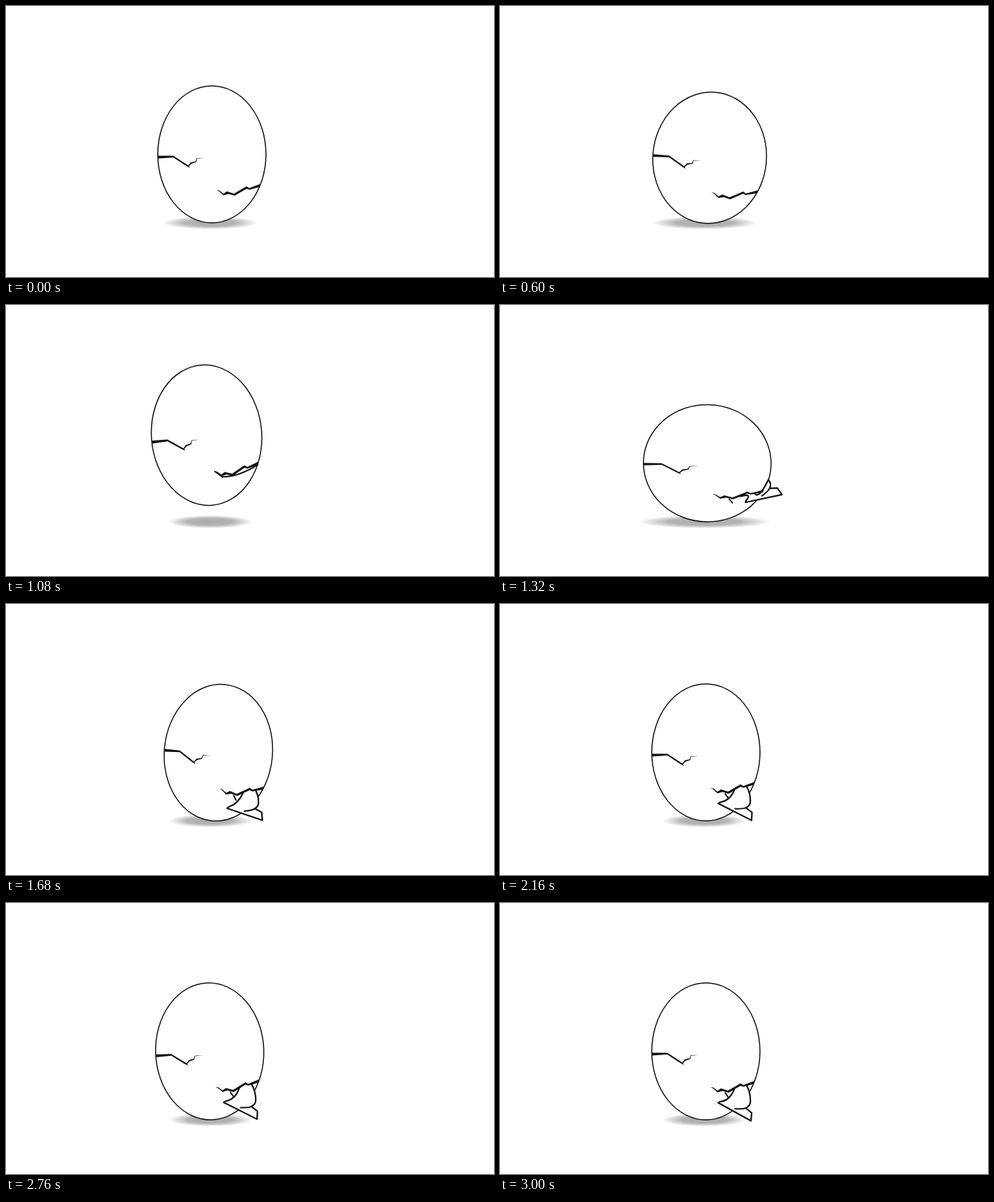
Recreate the animation shown at these times as an HTML page with a canvas. Size 700x390 px, loop 3480 ms.

```html
<!DOCTYPE html>
<html lang="en">
<head>
<meta charset="utf-8">
<title>Hatching egg</title>
<style>
  html, body { margin: 0; width: 100%; height: 100%; overflow: hidden; background: #fff; }
  canvas { display: block; }
</style>
</head>
<body>
<canvas id="stage" width="700" height="390"></canvas>
<script>
const ctx = document.getElementById('stage').getContext('2d');
const LOOP = 3480, HOLD = 600, STEP = 120, LAST_STEP = 21;
const CENTER_X = 295.3, GROUND = 312;

// Each track holds [step, value] keys with straight motion between them.
const tilt = track([0, 0], [2, 10], [4, -2], [5, -4.3], [6, 0], [11, 6.8], [16, -4.5], [21, 0]);
const width = track([0, 1], [2, 1.1], [3, 1], [4, 1.03], [5, 1.02], [7, 1.18], [9, 1]);
const lift = track([0, 0], [2, -1], [3, 24], [4, 52], [5, 23.8], [6, 0]);
const shift = track([0, 0], [2, -5.6], [4, 0]);
const shadow = track([0, 68], [2, 83], [4, 54], [5, 61], [7, 95], [9, 60]);
const heelX = track([6, 325], [7, 352], [10, 317], [11, 318], [14, 313], [16, 311], [21, 313]);
const heelY = track([6, 278], [7, 284], [10, 294], [14, 287], [16, 286], [21, 287.5]);
const footAngle = track([6, 0], [7, -12], [10, 18.8], [11, 17], [14, 27], [16, 23.5], [21, 29]);

function track(...keys) {
  return step => {
    const next = keys.findIndex(key => key[0] >= step);
    if (next < 1) return keys.at(next)[1];
    const [from, start] = keys[next - 1], [to, end] = keys[next];
    return start + (end - start) * (step - from) / (to - from);
  };
}

function place(x, y, degrees) {
  ctx.setTransform(1, 0, 0, 1, x, y);
  ctx.rotate(degrees * Math.PI / 180);
}

function paint(lineWidth, fill) {
  ctx.resetTransform();
  if (fill) {
    ctx.fillStyle = fill;
    ctx.fill();
  }
  ctx.lineWidth = lineWidth;
  ctx.stroke();
}

function drawShadow(radius) {
  ctx.setTransform(radius, 0, 0, 9.5, 293, GROUND);
  const gradient = ctx.createRadialGradient(0, 0, 0, 0, 0, 1);
  gradient.addColorStop(0, '#aaa');
  gradient.addColorStop(0.55, '#b5b5b5');
  gradient.addColorStop(1, '#fff');
  ctx.fillStyle = gradient;
  ctx.beginPath();
  ctx.arc(0, 0, 1, 0, 7);
  ctx.fill();
}

// Path points are added in whichever space is active, egg or foot.
function drawFoot(eggSpace, footSpace) {
  ctx.beginPath();
  eggSpace();
  ctx.moveTo(336, 268);
  footSpace();
  ctx.quadraticCurveTo(13, -11, 2, -3);
  ctx.lineTo(0, 0);
  ctx.lineTo(53.7, 0);
  ctx.lineTo(49, -10.6);
  ctx.lineTo(38, -12.5);
  ctx.quadraticCurveTo(43, -18, 39, -25);
  eggSpace();
  ctx.quadraticCurveTo(359, 272, 354, 263);
  paint(2.2, '#fff');

  ctx.beginPath();
  footSpace();
  ctx.moveTo(25, -4.2);
  ctx.quadraticCurveTo(34, -8, 39, -13);
  eggSpace();
  ctx.moveTo(323, 273);
  ctx.lineTo(327, 279);
  paint(2);
}

function drawPeek(eggSpace) {
  ctx.beginPath();
  eggSpace();
  ctx.moveTo(303, 265);
  ctx.lineTo(313, 273.5);
  ctx.quadraticCurveTo(337, 275, 364, 260);
  paint(2);
}

function drawCracks(eggSpace) {
  eggSpace();
  ctx.fillStyle = '#111';
  ctx.fill(new Path2D(`M218 215.5H240L261.5 229.5 265 225 272 223.5 273.5 219 285 218.7
    274 219.8 273 224.5 266 227 262.5 230.5 264 233 259 230.5 240 218 218 219.5Z`));
  ctx.fill(new Path2D(`M302 265 306 265.5 312 270 317 266.8 327 270 345 259.5 349 262 365 256
    363.5 260.5 349 264.5 345 263 328 273 319 270.5 312 272.5 306 267Z`));
}

function draw(step) {
  const stretch = 1 - 0.8 * (width(step) - 1) + 0.0018 * lift(step);
  const eggSpace = () => {
    place(CENTER_X + shift(step), GROUND - lift(step), tilt(step));
    ctx.scale(width(step), stretch);
    ctx.translate(-CENTER_X, -GROUND);
  };
  const footSpace = () => place(heelX(step), heelY(step), footAngle(step));

  ctx.resetTransform();
  ctx.clearRect(0, 0, 700, 390);
  ctx.strokeStyle = '#111';
  ctx.lineJoin = ctx.lineCap = 'round';
  drawShadow(shadow(step));

  ctx.beginPath();
  eggSpace();
  ctx.ellipse(CENTER_X, 213.5, 77.6, 98.5, 0, 0, 2 * Math.PI);
  paint(1.5, '#fff');

  if (step === 5) drawPeek(eggSpace);
  if (step > 5) drawFoot(eggSpace, footSpace);
  drawCracks(eggSpace);
}

function tick() {
  const time = performance.now() % LOOP;
  const step = Math.floor((time - HOLD) / STEP) + 1;
  draw(Math.min(LAST_STEP, Math.max(0, step)));
  requestAnimationFrame(tick);
}
tick();
</script>
</body>
</html>
```
